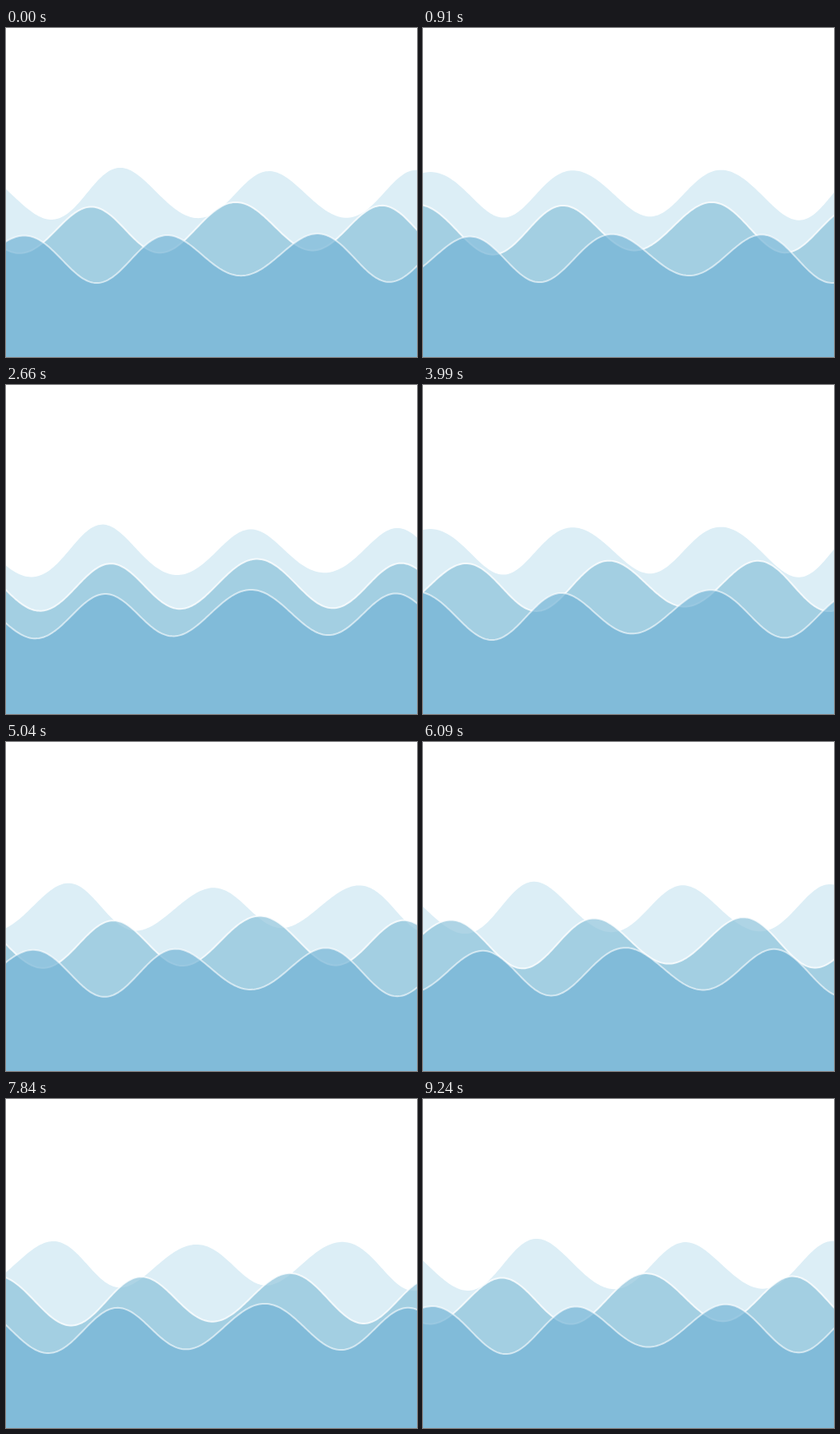
An HTML page with a canvas for the animation above (9310 ms loop, 500 px wide and 400 px high).

```html
<!DOCTYPE html>
<html lang="en">
<head>
<meta charset="utf-8">
<title>Waves</title>
<style>
  html, body { margin: 0; width: 100%; height: 100%; overflow: hidden; background: #fff; }
  canvas { display: block; width: 500px; height: 400px; }
</style>
</head>
<body>
<canvas id="stage" width="500" height="400"></canvas>
<script>
const WIDTH = 500, HEIGHT = 400;
const LOOP = 9310, STEP = 70;
const WAVELENGTH = 178;
const ctx = document.getElementById('stage').getContext('2d');

// Each wave is a travelling cosine. Its level, height and phase also vary gently
// across the stage. speed is px/ms, start is the x of a trough at time zero.
const waves = [
  {
    fill: 'rgb(220,238,246)',
    speed: 0.0577, start: 49, sway: 5,
    level: 201.8, amp: 28.2, swell: 2,
    tilt: { size: 2.3, period: 220, crest: 20 },
    drift: { size: 3, period: 190, crest: 60 }
  },
  {
    fill: 'rgba(140,194,219,0.7)', stroke: 'rgba(255,255,255,0.8)',
    speed: 0.0762, start: 13, sway: 0,
    level: 243.5, amp: 29, swell: 0,
    tilt: { size: 3, period: 440, crest: 95 },
    drift: { size: 3, period: 330, crest: 50 }
  },
  {
    fill: 'rgba(116,180,214,0.7)', stroke: 'rgba(255,255,255,0.6)',
    speed: 0.0374, start: 109.3, sway: 0,
    level: 278.5, amp: 27, swell: 1,
    tilt: { size: 3.6, period: 420, crest: 100 },
    drift: { size: 3.5, period: 330, crest: 50 }
  }
];

const cycle = (px, period) => Math.cos(px / period * 2 * Math.PI);
const ripple = ({ size, period, crest }, x) => size * cycle(x - crest, period);

function surface(wave, x, time) {
  const travel = wave.speed * time;
  const sway = wave.sway * cycle(travel + 13, WAVELENGTH);
  const offset = x - ripple(wave.drift, x) - wave.start - sway - travel;
  const height = wave.amp + wave.swell * cycle(x - 90, 420);
  return wave.level + ripple(wave.tilt, x) + height * cycle(offset, WAVELENGTH);
}

function drawWave(wave, time) {
  const crest = new Path2D();
  for (let x = -4; x <= WIDTH + 4; x += 2) crest.lineTo(x, surface(wave, x, time));
  const body = new Path2D(crest);
  body.lineTo(WIDTH + 4, HEIGHT);
  body.lineTo(-4, HEIGHT);
  body.closePath();
  ctx.fillStyle = wave.fill;
  ctx.fill(body);
  if (wave.stroke) {
    ctx.strokeStyle = wave.stroke;
    ctx.lineWidth = 2;
    ctx.stroke(crest);
  }
}

function draw(time) {
  ctx.fillStyle = '#fff';
  ctx.fillRect(0, 0, WIDTH, HEIGHT);
  for (const wave of waves) drawWave(wave, time);
}

const begin = performance.now();
function tick() {
  const elapsed = (performance.now() - begin) % LOOP;
  draw(Math.floor(elapsed / STEP) * STEP);
  requestAnimationFrame(tick);
}
tick();
</script>
</body>
</html>
```
